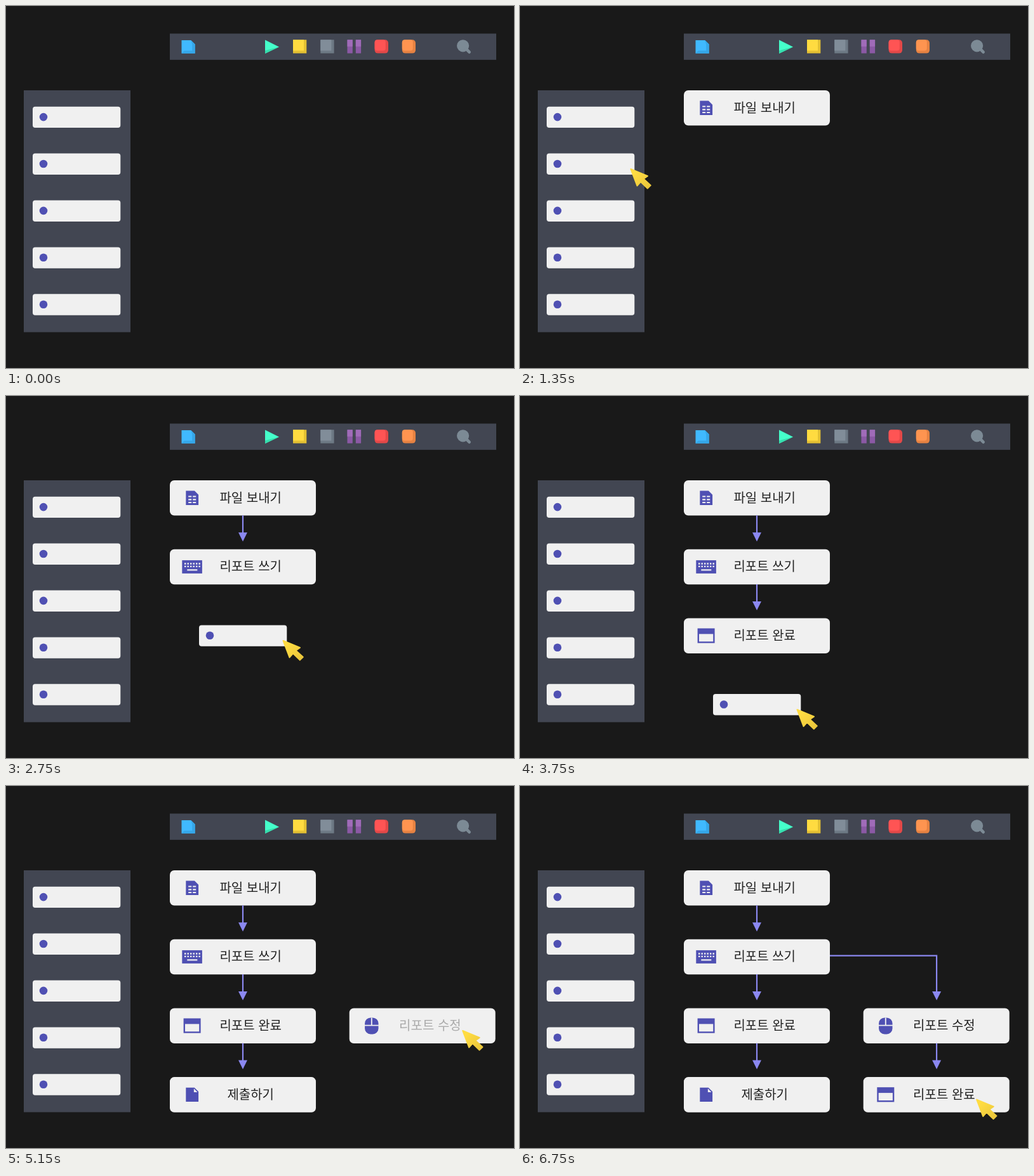
An HTML page that plays this animation: 800 px wide and 571 px high, repeating every 6800 ms.

```html
<!DOCTYPE html>
<html lang="ko">
<head>
<meta charset="utf-8">
<title>Flow builder</title>
<style>
  html, body { margin: 0; width: 100%; height: 100%; overflow: hidden; background: #191919; }
  svg { display: block; width: 100vw; height: 100vh; }
  text { font: 400 20px "Noto Sans CJK KR", "Noto Sans KR", "Noto Sans CJK", sans-serif; fill: #222; text-anchor: middle; }
</style>
</head>
<body>
<svg id="stage" viewBox="0 0 800 571">
  <defs>
    <linearGradient id="gold" x1="0" y1="0" x2="1" y2="1">
      <stop offset="0.2" stop-color="#ffdc42"/>
      <stop offset="1" stop-color="#e8c43a"/>
    </linearGradient>
    <g id="item">
      <rect width="138.3" height="33.4" rx="4" fill="#f0f0f0"/>
      <circle cx="17" cy="16.4" r="6.3" fill="#4f50b3"/>
    </g>
    <g id="sheet" fill="#4f50b3">
      <path d="M25.3 16.6h13.6l6.2 6.2v16.2h-19.8z"/>
      <path d="M29.2 25.5h5m2 0h5M29.2 30.3h5m2 0h5M29.2 35h5m2 0h5" stroke="#f0f0f0" stroke-width="2.2"/>
    </g>
    <g id="keyboard">
      <rect x="19.3" y="17.4" width="31.6" height="20.8" fill="#4f50b3"/>
      <path d="M23 22.8h26M23 27.2h26" stroke="#f0f0f0" stroke-width="2.3" stroke-dasharray="2.4 2.1"/>
      <path d="M27.3 32.7h16" stroke="#f0f0f0" stroke-width="2.2"/>
    </g>
    <g id="window">
      <rect x="21.6" y="16.1" width="27" height="23.2" fill="#4f50b3"/>
      <rect x="24" y="25" width="22.2" height="11.9" fill="#f0f0f0"/>
    </g>
    <g id="page">
      <path d="M25.3 16.6h13.4l6.4 6.4v16h-19.8z" fill="#4f50b3"/>
      <path d="M37.9 18.2v5.6h5.6z" fill="#f0f0f0"/>
    </g>
    <g id="mouse">
      <rect x="24.4" y="15" width="21.4" height="26" rx="9" fill="#4f50b3"/>
      <path d="M35.1 15v11.6M24 27.2h22.2" stroke="#f0f0f0" stroke-width="1.9"/>
    </g>
  </defs>

  <g id="toolbar">
    <rect x="258" y="43.5" width="514" height="41.4" fill="#424652"/>
    <path d="M276.5 54h14.7l6.4 6.3v14.5h-21.1z" fill="#40b9ff"/>
    <path d="M291.2 54l6.4 6.3v14.5h-21.1l4-4.2h12.6v-10.3z" fill="#35a6e8"/>
    <path d="M408 53.5L430 64.5 408 75z" fill="#45ffca"/>
    <path d="M408 70.2L430 64.5 408 75z" fill="#36dfae"/>
    <circle cx="719.6" cy="62.8" r="9.6" fill="#7c8a95"/>
    <path d="M724.5 67.5L729.6 72.6" stroke="#7c8a95" stroke-width="4.8" stroke-linecap="round"/>
  </g>
  <rect x="28" y="133" width="168" height="381.5" fill="#424652"/>
  <g id="list"></g>
  <g id="flow"></g>
  <use id="held" href="#item"/>
  <path id="cursor" d="M1.5 1.5L28 12.5 21.5 17 32.8 27.3 27.8 32.2 17 21.7 11.5 28z"
        fill="url(#gold)" stroke="url(#gold)" stroke-width="2" stroke-linejoin="round"/>
</svg>
<script>
const LOOP = 6800, TICK = 50;
const $ = id => document.getElementById(id);

function add(parent, tag, attrs, text) {
  const el = document.createElementNS("http://www.w3.org/2000/svg", tag);
  for (const k in attrs) el.setAttribute(k, attrs[k]);
  if (text) el.textContent = text;
  parent.appendChild(el);
  return el;
}

// Toolbar buttons: x, width, corner radius, face, shade
[
  [452, 21.3, 0, "#ffdb40", "#e3c033"],
  [495.3, 21.3, 0, "#818d99", "#6d7985"],
  [537.5, 8.3, 0, "#a06bb9", "#8b59a5"],
  [550.8, 8.3, 0, "#a06bb9", "#8b59a5"],
  [580.6, 21.4, 5, "#ff5454", "#e34848"],
  [623.8, 21.2, 5, "#ff9450", "#e68242"]
].forEach(([x, w, r, face, shade]) => {
  const edge = w > 10 ? 4.2 : 0;
  add($("toolbar"), "rect", { x, y: 53.3, width: w, height: 21.3, rx: r, fill: shade });
  add($("toolbar"), "rect", { x, y: 53.3, width: w - edge, height: edge ? 17.2 : 10.6, rx: r * 0.8, fill: face });
});

const slotPos = i => [42, 158.7 + 73.9 * i];
const cardPos = (col, row) => [258 + 282.7 * col, 133 + 108.7 * row];
const dropPos = (col, row) => {
  const [x, y] = cardPos(col, row);
  return [x + 46, y + 11];
};

const slots = [0, 1, 2, 3, 4].map(i => {
  const [x, y] = slotPos(i);
  return add($("list"), "use", { href: "#item", x, y });
});

// Each step: slot, cell, label, icon, then the spans of fetch, drag, card and arrow
const steps = [
  { slot: 0, cell: [0, 0], label: "파일 보내기", icon: "sheet", drag: [550, 700], card: [850, 950] },
  { slot: 1, cell: [0, 1], label: "리포트 쓰기", icon: "keyboard", fetch: [1200, 1350], drag: [1550, 1700], card: [1900, 2000], arrow: [2050, 2150] },
  { slot: 2, cell: [0, 2], label: "리포트 완료", icon: "window", fetch: [2250, 2400], drag: [2550, 2750], card: [2900, 3000], arrow: [3050, 3200] },
  { slot: 3, cell: [0, 3], label: "제출하기", icon: "page", fetch: [3300, 3450], drag: [3600, 3750], card: [3950, 4000], arrow: [4150, 4250] },
  { slot: 4, cell: [1, 2], label: "리포트 수정", icon: "mouse", fetch: [4300, 4450], drag: [4600, 4850], card: [5150, 5250], arrow: [5300, 5500], branch: true },
  { slot: 2, cell: [1, 3], label: "리포트 완료", icon: "window", fetch: [5550, 5700], drag: [5900, 6150], card: [6300, 6450], arrow: [6500, 6750] }
];

function addArrow(x, y, branch) {
  const g = add($("flow"), "g", { fill: "#8b88f0" });
  const d = branch ? `M488 267.6H${x}V${y - 24}` : `M${x} ${y - 53.4}V${y - 24}`;
  add(g, "path", { d, fill: "none", stroke: "#8b88f0", "stroke-width": 2.2 });
  add(g, "path", { d: `M${x - 7} ${y - 26.5}h14l-7 14.2z` });
  return g;
}

for (const s of steps) {
  const [x, y] = cardPos(...s.cell);
  if (s.arrow) s.link = addArrow(x + (s.cell[0] ? 115.4 : 115), y, s.branch);
  s.box = add($("flow"), "g", { transform: `translate(${x} ${y})` });
  add(s.box, "rect", { width: 230, height: 55.6, rx: 7, fill: "#f0f0f0" });
  add(s.box, "use", { href: "#" + s.icon });
  s.text = add(s.box, "text", { x: 127.2, y: 34.8 }, s.label);
}

const clamp = v => Math.max(0, Math.min(1, v));
const fade = (t, [a, b]) => clamp((t - a + TICK) / (b - a + TICK));
const glide = (t, [a, b]) => {
  const p = clamp((t - a + 30) / (b - a + 4));
  return p * p * (3 - 2 * p);
};
const mix = (a, b, p) => a.map((v, i) => v + (b[i] - v) * p);
const place = (el, [x, y]) => el.setAttribute("transform", `translate(${x} ${y})`);
const show = (el, o) => el.setAttribute("opacity", o);

function draw(t) {
  let pos = slotPos(0), holding = false;
  slots.forEach(el => show(el, 1));

  for (const s of steps) {
    if (s.fetch && t >= s.fetch[0]) pos = mix(pos, slotPos(s.slot), glide(t, s.fetch));
    if (t >= s.drag[0]) {
      const p = glide(t, s.drag);
      pos = mix(slotPos(s.slot), dropPos(...s.cell), p);
      holding = t < s.card[0];
      show(slots[s.slot], p);
    }
    // the next fetch starts from the drop point, so pos carries over
    show(s.box, t >= s.card[0] ? 1 : 0);
    show(s.text, fade(t, s.card));
    if (s.link) show(s.link, t >= s.arrow[0] ? fade(t, s.arrow) : 0);
  }

  place($("held"), pos);
  show($("held"), holding ? 1 : 0);
  place($("cursor"), [pos[0] + 131, pos[1] + 23]);
  show($("cursor"), t >= 200 ? fade(t, [200, 350]) : 0);
}

const start = performance.now();
function frame(now) {
  const t = Math.max(0, now - start) % LOOP;
  draw(Math.floor(t / TICK) * TICK);
  requestAnimationFrame(frame);
}
draw(0);
requestAnimationFrame(frame);
</script>
</body>
</html>
```
